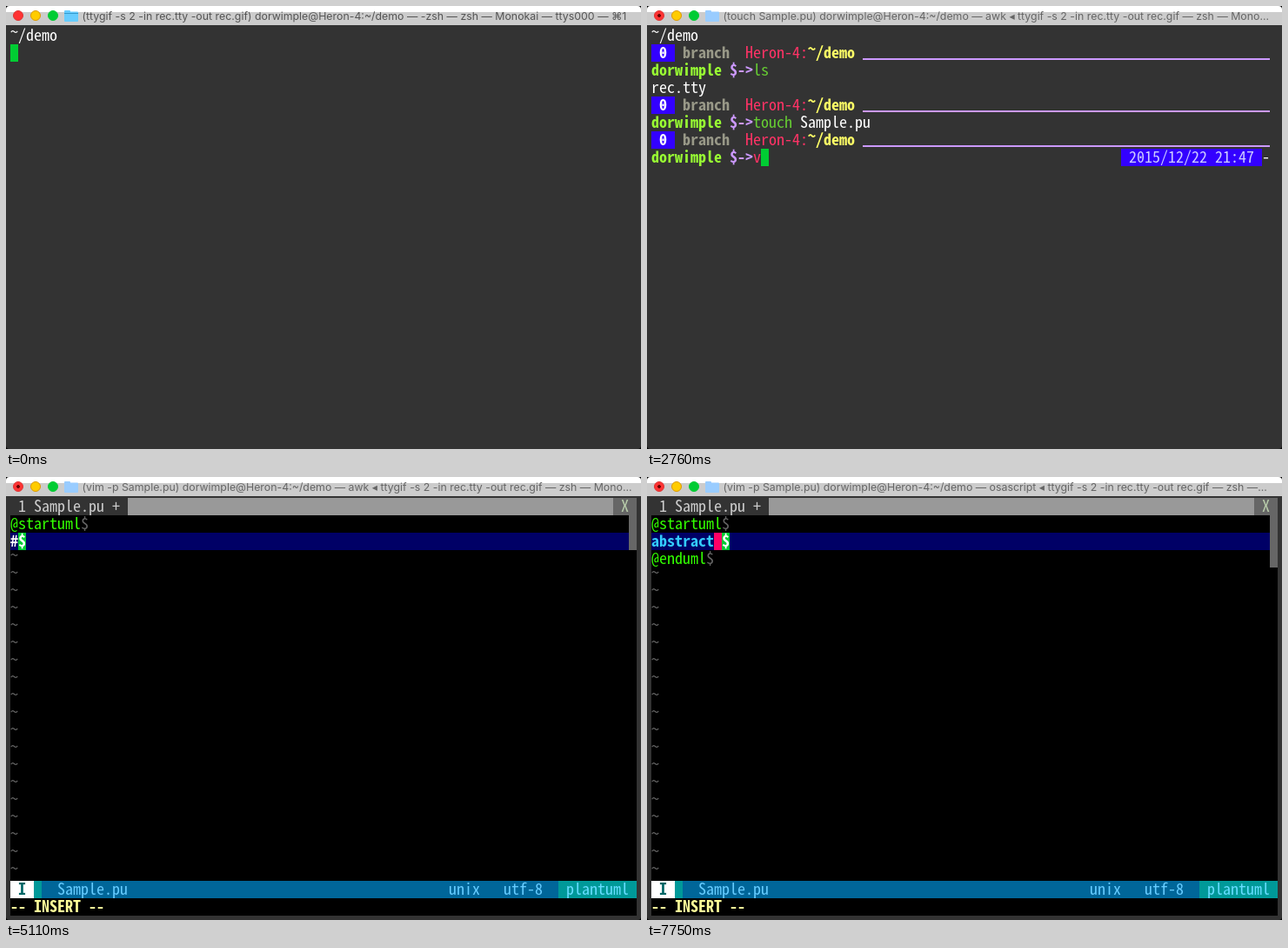
Recreate the animation shown at these times as an HTML page with a canvas. Size 730 by 509 pixels, loop 8000 ms.

```html
<!DOCTYPE html>
<html lang="en">
<head>
<meta charset="utf-8">
<title>Terminal session</title>
<style>
  html, body { margin: 0; width: 730px; height: 509px; overflow: hidden; background: #000; }
  canvas { display: block; }
</style>
</head>
<body>
<canvas id="stage" width="730" height="509"></canvas>
<script>
const ctx = document.getElementById('stage').getContext('2d', { alpha: false });
const LOOP = 8000, W = 730, H = 509;
const CW = 9, CH = 20, X0 = 5, Y0 = 24, COLS = 80, ROWS = 24;
const USER = 'dorwimple', HOST = 'Heron-4';
const TTYGIF = 'ttygif -s 2 -in rec.tty -out rec.gif';
const GREEN = '#00cc33', DARK = '#333', GREY = '#666', PURPLE = '#cc99ff';

// Size the monospace face so one character is exactly one cell wide.
const MONO = '"Noto Sans Mono CJK JP", "Noto Sans Mono CJK SC", "Noto Sans Mono", monospace';
ctx.font = `100px ${MONO}`;
const SIZE = CW * 100 / ctx.measureText('0').width;
const FACE = `${SIZE}px ${MONO}`;
const TITLE_FACE = '12.35px Inter, Roboto, sans-serif';

/* ---------- drawing helpers ---------- */
function rect(x, y, w, h, color) {
  ctx.fillStyle = color;
  ctx.fillRect(x, y, w, h);
}

function disc(x, y, r, color, edge = color) {
  ctx.fillStyle = color;
  ctx.strokeStyle = edge;
  ctx.beginPath();
  ctx.arc(x, y, r - 0.5, 0, Math.PI * 2);
  ctx.fill();
  ctx.stroke();
}

const cells = (row, col, n, color, rows = 1) =>
  rect(X0 + col * CW, Y0 + row * CH, n * CW, rows * CH, color);

function text(row, col, str, color, bold = false) {
  ctx.font = (bold ? 'bold ' : '') + FACE;
  ctx.fillStyle = color;
  [...str].forEach((ch, i) => {
    const x = X0 + (col + i) * CW, y = Y0 + row * CH + 16;
    ctx.fillText(ch, x, ch === '~' ? y - 4 : y);
    if (ch === '0') ctx.fillRect(x + 3.5, y - 7.5, 2, 2.5); // dotted zero
  });
}

/* ---------- script of the session ---------- */
const events = [];
const at = (t, run) => events.push([t, run]);
const title = (t, proc) => at(t, s => { s.proc = proc ? proc + ' ◂ ' : ''; });

function insert(s, str) {
  if (!s.vim) { s.log.at(-1).line += str; return; }
  const v = s.vim, line = v.lines[v.row];
  v.lines[v.row] = line.slice(0, v.col) + str + line.slice(v.col);
  v.col += str.length;
  v.dirty = true;
}

function type(from, to, str) {
  const step = (to - from) / Math.max(1, str.length - 1);
  [...str].forEach((ch, i) => at(from + step * i, s => insert(s, ch)));
}

const prompt = t => at(t, s => { s.log.push({ line: '', live: true, out: '' }); });

const enter = (t, cmd, out = '') => at(t, s => {
  Object.assign(s.log.at(-1), { live: false, out });
  s.cmd = cmd;
});

const edit = (t, change) => at(t, s => change(s.vim));

at(290, s => { s.started = true; });
prompt(290);
type(580, 620, 'ls');
enter(660, 'ls -G', 'rec.tty');
prompt(700);
type(1010, 1120, 'tou');
type(1370, 1500, 'ch');
type(1660, 1930, ' S');
type(2230, 2580, 'ample.pu');
enter(2630, 'touch Sample.pu');
prompt(2700);
type(2750, 2910, 'vim ');
type(3010, 3130, 'Sam');
type(3190, 3190, 'ple.pu');
enter(3270, 'vim -p Sample.pu');

at(3450, s => {
  s.vim = { lines: [''], row: 0, col: 0, insert: false, dirty: false, junk: '', msg: '' };
});
edit(3630, v => { v.insert = true; v.junk = '^[[>1;95;0c'; });
edit(3680, v => { v.junk = '^[[>1;95;0c^[[3;9R'; v.msg = '[co'; });
edit(4010, v => { v.junk = v.msg = ''; });
type(4080, 4680, '@startuml');
edit(4760, v => { v.lines.push(''); v.row = 1; v.col = 0; });
type(5110, 5110, '#');
edit(5270, v => { v.lines[1] = ''; v.col = 0; });
type(5380, 5380, '@');
type(5540, 5540, 'e');
type(5840, 6120, 'nduml');
edit(6370, v => { v.insert = false; v.col--; });
edit(6570, v => { v.lines.splice(1, 0, ''); v.col = 0; v.insert = true; });
type(7100, 7750, 'abstract ');

const OSA = 'osascript', AWK = 'awk';
[[1010, OSA], [1120], [1370, OSA], [1500], [1660, OSA], [1990], [2180, OSA], [2500],
 [2700, AWK], [3010], [3360, OSA], [3380], [4010, OSA], [4300], [4760, AWK], [5270],
 [5380, OSA], [5840], [6190, AWK], [6450, OSA], [7100], [7750, OSA]]
  .forEach(([t, proc]) => title(t, proc));
events.sort((a, b) => a[0] - b[0]);

function stateAt(t) {
  const s = { started: false, log: [], proc: '', cmd: TTYGIF, vim: null };
  for (const [time, run] of events) {
    if (time > t) break;
    run(s);
  }
  return s;
}

/* ---------- window frame ---------- */
function drawFolder(color, edge) {
  ctx.fillStyle = color;
  ctx.beginPath();
  ctx.roundRect(67, 5, 7, 5, 1);
  ctx.roundRect(67, 6.5, 16, 11.5, 1);
  ctx.fill();
  rect(67, 8, 16, 1, edge);
}

function drawTitle(s) {
  rect(0, 0, W, 7, '#fff');
  rect(0, 7, W, 15, '#ccc');
  disc(14, 11, 6, '#ff3333', '#dd3333');
  disc(34, 11, 6, '#ffcc00', '#dd9900');
  disc(54, 11, 6, GREEN);
  if (s.started) {
    disc(14, 11, 2, '#660000');
    drawFolder('#99ccff', '#99ccff');
  } else {
    drawFolder('#66ccff', '#3399cc');
  }

  const job = s.started ? s.proc + TTYGIF : '-zsh';
  let str = `(${s.cmd}) ${USER}@${HOST}:~/demo — ${job} — zsh — Monokai — ttys000 — ⌘1`;
  ctx.font = TITLE_FACE;
  const fits = str => ctx.measureText(str).width <= 633;
  if (!fits(str)) {
    while (!fits(str + '...')) str = str.slice(0, -1);
    str = str.trimEnd() + '...';
  }
  ctx.fillStyle = s.started ? '#666' : '#555';
  ctx.fillText(str, 87.5, 16);
}

/* ---------- shell ---------- */
function drawPrompt(row) {
  cells(row, 0, 3, '#3300ff');
  text(row, 1, '0', '#fff', true);
  text(row, 4, 'branch', '#999988', true);
  text(row, 12, HOST + ':', '#ff3366');
  text(row, 20, '~/demo', '#ffff66', true);
  rect(X0 + 27 * CW, Y0 + row * CH + 16, 52 * CW, 2, PURPLE);
}

function drawCommand(row, { line, live }) {
  const [word, arg = ''] = line.split(' ');
  const known = /^(ls|touch|vim?)$/.test(word);
  const col = 13, argCol = col + word.length + 1;
  text(row, 0, USER, '#99ff33', true);
  text(row, 10, '$->', PURPLE, true);
  text(row, col, word, known ? '#66cc33' : '#ff3366');

  const partial = live && arg && (arg.length < 2 || word === 'vim');
  const tint = partial && arg !== 'Sample.pu' ? '#ddbb66' : '#fff';
  text(row, argCol, arg, tint);
  if (partial) rect(X0 + argCol * CW, Y0 + row * CH + 21, arg.length * CW, 1, tint);

  if (live) {
    cells(row, 60, 18, '#3300ff');
    text(row, 61, '2015/12/22 21:47', '#ccccff');
    text(row, 78, '-', '#fff');
    cells(row, col + line.length, 1, GREEN);
  }
}

function drawShell(s) {
  text(0, 0, '~/demo', '#fff');
  let row = 1;
  for (const entry of s.log) {
    drawPrompt(row++);
    drawCommand(row++, entry);
    if (entry.out) text(row++, 0, entry.out, '#fff');
  }
  const last = s.log.at(-1);
  if (!last || !last.live) cells(row, 0, 1, GREEN);
}

/* ---------- editor ---------- */
function lineColor(line) {
  if (/^@(start|end)uml$/.test(line)) return '#33ff00';
  return line.trim() === 'abstract' ? '#33ccff' : '#fff';
}

function drawTabs(v) {
  const label = v.dirty ? ' 1 Sample.pu + ' : ' 1 Sample.pu ';
  cells(0, 0, COLS, '#999');
  cells(0, 0, label.length, DARK);
  text(0, 0, label, '#ccc');
  cells(0, 77, 3, GREY);
  text(0, 78, 'X', '#b8ccaa');
}

function drawStatus(v) {
  const c = v.insert
    ? { badge: '#fff', mode: '#006666', edge: '#009999', bar: '#006699', fg: '#66ccff', type: '#66ddff' }
    : { badge: '#99cc00', mode: '#006600', edge: GREY, bar: DARK, fg: '#999', type: '#ccccaa' };
  cells(22, 0, COLS, c.bar);
  cells(22, 0, 3, c.badge);
  cells(22, 3, 1, c.edge);
  cells(22, 70, 10, c.edge);
  text(22, 1, v.insert ? 'I' : 'N', c.mode, true);
  text(22, 6, 'Sample.pu', c.fg);
  text(22, 56, 'unix', c.fg);
  text(22, 63, 'utf-8', c.fg);
  text(22, 71, 'plantuml', c.type);
  if (v.insert) {
    text(23, 0, '-- INSERT --', '#ffff99', true);
    text(23, 12, v.msg, '#fff');
  }
}

function drawVim(v) {
  cells(0, 0, COLS, '#000', ROWS);
  drawTabs(v);
  cells(v.row + 1, 0, 79, '#000066');
  cells(1, 79, 1, GREY, v.lines.length);
  cells(v.row + 1, 0, v.junk.length, GREY);

  v.lines.forEach((line, i) => {
    const row = i + 1, here = i === v.row;
    if (line.endsWith(' ')) cells(row, line.length - 1, 1, '#ff0066');
    if (here) cells(row, v.col, 1, GREEN);
    if (here && v.junk) {
      [...v.junk].forEach((ch, k) => text(row, k, ch, ch === '[' ? '#ccaaaa' : '#c8c8b0'));
      return;
    }
    text(row, 0, line, lineColor(line), here);
    text(row, line.length, '$', here ? '#fff' : GREY, here);
  });

  for (let row = v.lines.length + 1; row < 22; row++) text(row, 0, '~', GREY);
  drawStatus(v);
}

/* ---------- loop ---------- */
function draw(now) {
  const s = stateAt(now % LOOP);
  rect(0, 0, W, H, '#000');
  ctx.save();
  ctx.beginPath();
  ctx.roundRect(0, 0, W, H, 4);
  ctx.clip();
  rect(0, 0, W, H, DARK);
  drawTitle(s);
  if (s.vim) drawVim(s.vim); else drawShell(s);
  ctx.restore();
  requestAnimationFrame(() => draw(performance.now()));
}
draw(performance.now());
</script>
</body>
</html>
```
